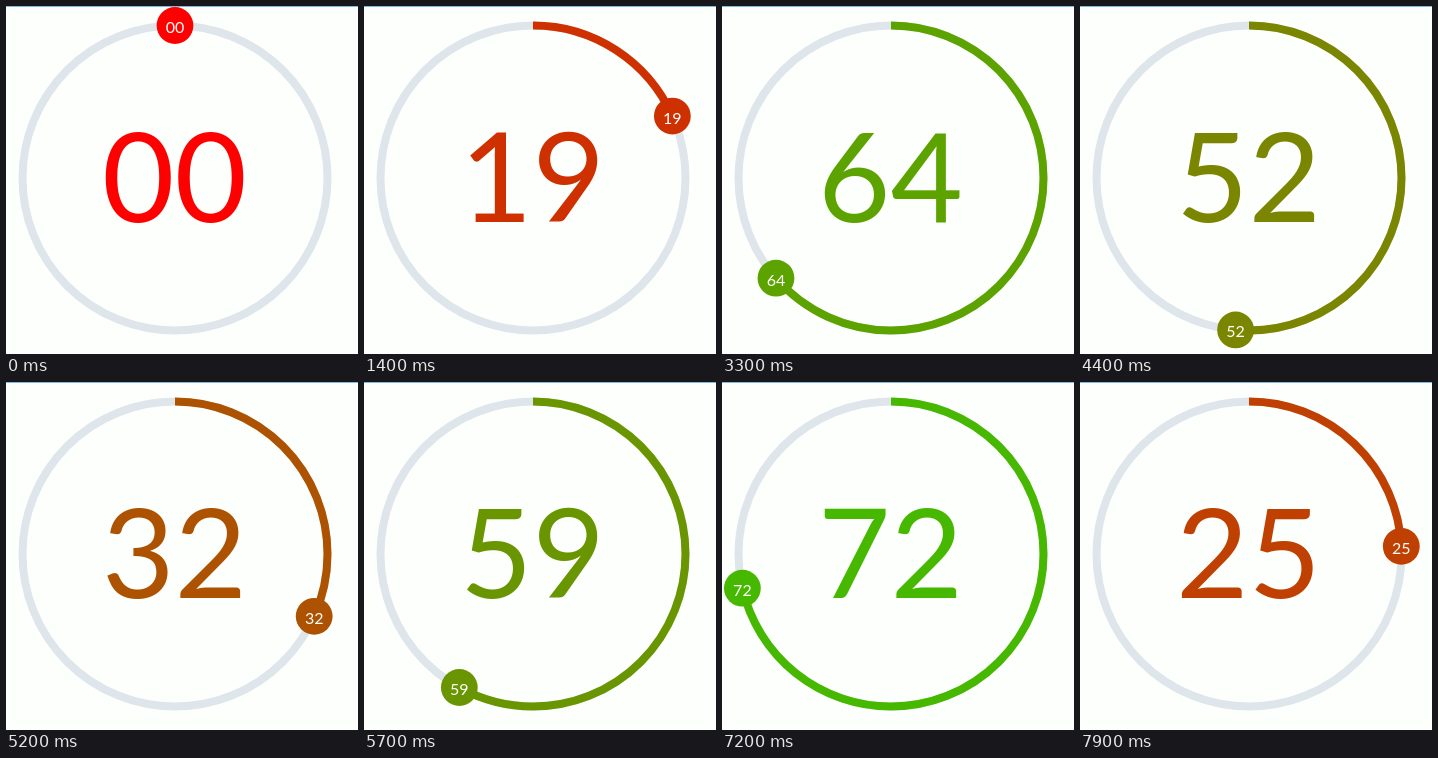
Write an HTML page with a canvas that moves like this. It is 352 px wide and 348 px high and loops after 8 s.

```html
<!DOCTYPE html>
<html lang="en">
<head>
<meta charset="utf-8">
<title>Circular slider</title>
<style>
  html, body { margin: 0; width: 100%; height: 100%; overflow: hidden; background: #fdfffc; }
  canvas { display: block; width: 352px; height: 348px; }
</style>
</head>
<body>
<canvas id="stage"></canvas>
<script>
const W = 352, H = 348, LOOP = 8000, STEP = 100;
const CX = 169, CY = 172, RADIUS = 152.5, TRACK = 8, KNOB = 18.4;

// Drag path: [time in steps, percent]
const PATH = [
  [4, 0], [8, 5.5], [13, 16], [22, 37.9], [23, 39.7], [31, 57], [33, 63.6],
  [36.5, 73.2], [40, 64.8], [44, 51.4], [49, 25.5], [50, 25], [52, 31.7],
  [58, 63.5], [63, 91.7], [65, 93.3], [68, 92.6], [71, 78.6], [72, 71.4],
  [76, 36.2], [79, 24.2]
];

const canvas = document.getElementById('stage');
const ctx = canvas.getContext('2d');
const dpr = window.devicePixelRatio || 1;
canvas.width = W * dpr;
canvas.height = H * dpr;
ctx.scale(dpr, dpr);

function slope(i) {
  const a = PATH[Math.max(i - 1, 0)];
  const b = PATH[Math.min(i + 1, PATH.length - 1)];
  return (b[1] - a[1]) / (b[0] - a[0]);
}

// Cubic Hermite curve through the path points
function valueAt(t) {
  const last = PATH.length - 1;
  if (t <= PATH[0][0]) return PATH[0][1];
  if (t >= PATH[last][0]) return PATH[last][1];
  let i = 0;
  while (t > PATH[i + 1][0]) i++;
  const [t0, v0] = PATH[i], [t1, v1] = PATH[i + 1];
  const h = t1 - t0, u = (t - t0) / h, w = 1 - u;
  return v0 * (1 + 2 * u) * w * w + v1 * u * u * (3 - 2 * u)
    + h * u * w * (w * slope(i) - u * slope(i + 1));
}

function ring(color, from, to) {
  ctx.strokeStyle = color;
  ctx.lineWidth = TRACK;
  ctx.beginPath();
  ctx.arc(CX, CY, RADIUS, from, to);
  ctx.stroke();
}

function label(text, size, x, y, color) {
  ctx.font = `400 ${size}px Lato, sans-serif`;
  ctx.textAlign = 'center';
  ctx.textBaseline = 'alphabetic';
  ctx.fillStyle = color;
  ctx.fillText(text, x, y);
}

function draw(value) {
  const shown = Math.ceil(value);
  const text = String(shown).padStart(2, '0');
  const green = Math.round(shown * 2.55);
  const color = `rgb(${255 - green}, ${green}, 0)`;
  const top = -Math.PI / 2;
  const angle = top + value / 100 * Math.PI * 2;
  const x = CX + RADIUS * Math.cos(angle);
  const y = CY + RADIUS * Math.sin(angle);

  ctx.fillStyle = '#fdfffc';
  ctx.fillRect(0, 0, W, H);
  ctx.fillStyle = '#7fbcdc';
  ctx.fillRect(0, 0, W, 1);

  ring('#dee6eb', 0, Math.PI * 2);
  if (value > 0) ring(color, top, angle);
  label(text, 125, CX - 0.5, 215.5, color);

  ctx.fillStyle = color;
  ctx.beginPath();
  ctx.arc(x, y, KNOB, 0, Math.PI * 2);
  ctx.fill();
  label(text, 16, x, y + 7.5, '#fff');
}

const start = performance.now();

function tick() {
  const time = (performance.now() - start) % LOOP;
  draw(valueAt(Math.floor(time / STEP)));
  requestAnimationFrame(tick);
}
tick();
</script>
</body>
</html>
```
